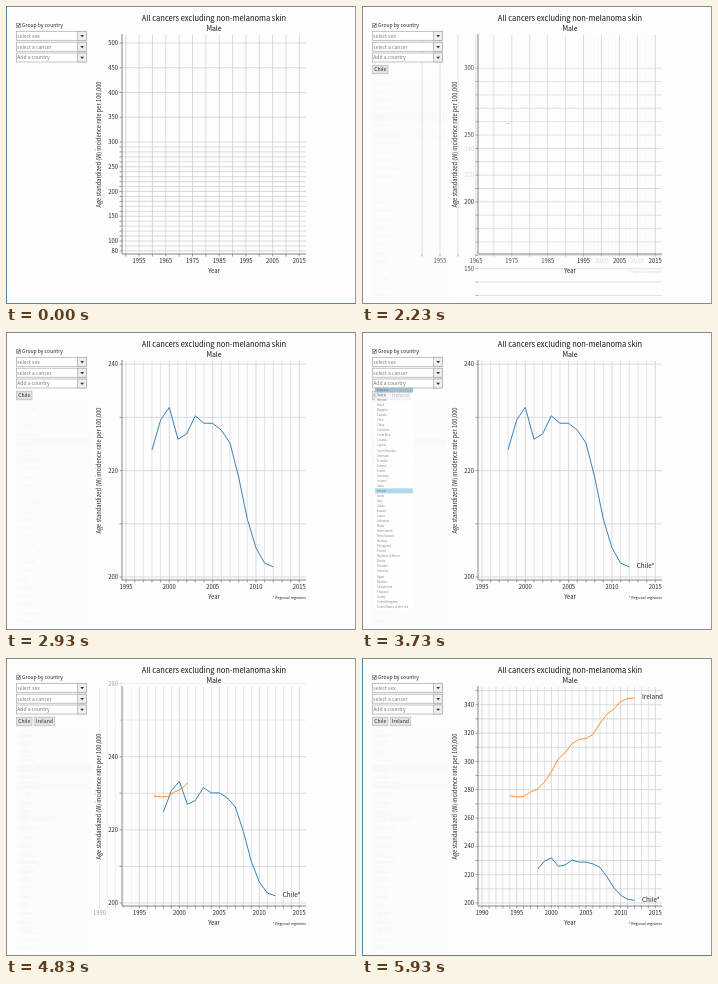
Recreate the animation shown at these times as an HTML page with a canvas. Size 350 px wide and 298 px high, loop 5960 ms.

```html
<!DOCTYPE html>
<html lang="en">
<head>
<meta charset="utf-8">
<title>Incidence rate chart</title>
<style>
  html, body { margin: 0; width: 100%; height: 100%; overflow: hidden; background: #fdfdfd; }
  canvas { display: block; width: 350px; height: 298px; }
</style>
</head>
<body>
<canvas></canvas>
<script>
const W = 350, H = 298, LOOP = 5960;
const LEFT = 116, RIGHT = 300, TOP = 30, BOTTOM = 248;
const FONT = '"Noto Sans CJK SC", "Noto Sans CJK JP", "Noto Sans CJK", "Noto Sans", sans-serif';
const canvas = document.querySelector('canvas');
const ctx = canvas.getContext('2d');
const dpr = window.devicePixelRatio || 1;
canvas.width = W * dpr;
canvas.height = H * dpr;

const clamp = v => Math.max(0, Math.min(1, v));
const mix = (a, b, p) => a + (b - a) * p;
const progress = (t, start, length) => clamp((t - start) / length);
const cubicInOut = p => p < .5 ? 4 * p ** 3 : 1 - 4 * (1 - p) ** 3;
const range = (from, to, step) =>
  Array.from({ length: Math.floor((to - from) / step) + 1 }, (_, i) => from + i * step);

// Each view has a scale (pixels per year / unit, position of 200) and its ticks.
const views = [
  { kx: 2.67, ky: .495, y200: 185.5,
    xLabels: range(1955, 2015, 10), xLines: range(1950, 2015, 5),
    yLabels: [80, ...range(100, 500, 50)],
    yLines: [...range(80, 300, 10), ...range(350, 500, 50)] },
  { kx: 8.667, ky: 5.32, y200: 245,
    xLabels: range(1995, 2015, 5), xLines: range(1995, 2015, 1),
    yLabels: range(200, 240, 20), yLines: range(200, 240, 10) },
  { kx: 6.93, ky: 1.416, y200: 245,
    xLabels: range(1990, 2015, 5), xLines: range(1990, 2015, 1),
    yLabels: range(200, 340, 20), yLines: range(200, 350, 10) }
];

const chile = { name: 'Chile*', color: '#3584bd', from: 1998, rates: [
  223.9, 229.5, 231.9, 225.9, 226.9, 230.3, 228.9, 228.9, 227.6, 225.2, 218.8, 210.9, 205.5, 202.6, 201.9] };
const ireland = { name: 'Ireland', color: '#fa8f31', from: 1994, rates: [
  275.6, 274.9, 275.2, 278.4, 280.5, 285.5, 292.5, 301.7, 306.3, 312.6,
  315.5, 316.2, 319, 326.8, 333.1, 337, 342.3, 344.4, 344.8] };

const countries = ('Australia,Austria,Bahrain,Brazil,Bulgaria,Canada,Chile,China,Colombia,Costa Rica,Croatia,' +
  'Cyprus,Czech Republic,Denmark,Ecuador,Estonia,France,Germany,Iceland,India,Ireland,Israel,Italy,Japan,' +
  'Kuwait,Latvia,Lithuania,Malta,Netherlands,New Zealand,Norway,Philippines,Poland,Republic of Korea,Russia,' +
  'Slovakia,Slovenia,Spain,Sweden,Switzerland,Thailand,Turkey,United Kingdom,United States of America').split(',');

function text(str, x, y, size, { color = '#222', align = 'left', weight = 400 } = {}) {
  ctx.font = `${weight} ${size}px ${FONT}`;
  ctx.fillStyle = color;
  ctx.textAlign = align;
  ctx.textBaseline = 'alphabetic';
  ctx.fillText(str, x, y + size * .365);
}

function line(x1, y1, x2, y2, color, width = .7) {
  ctx.strokeStyle = color;
  ctx.lineWidth = width;
  ctx.beginPath();
  ctx.moveTo(x1, y1);
  ctx.lineTo(x2, y2);
  ctx.stroke();
}

function box(x, y, w, h, fill, stroke) {
  ctx.fillStyle = fill;
  ctx.fillRect(x, y, w, h);
  if (!stroke) return;
  ctx.strokeStyle = stroke;
  ctx.lineWidth = .7;
  ctx.strokeRect(x, y, w, h);
}

function withAlpha(alpha, draw) {
  if (alpha <= 0) return;
  ctx.save();
  ctx.globalAlpha *= alpha;
  draw();
  ctx.restore();
}

const scaleX = (s, year) => 293.3 + (year - 2015) * s.kx;
const scaleY = (s, rate) => s.y200 - (rate - 200) * s.ky;

function blendScale(a, b, px, py) {
  return { kx: mix(a.kx, b.kx, px), ky: mix(a.ky, b.ky, py), y200: mix(a.y200, b.y200, py) };
}

// Shared ticks stay solid; the others fade out of one view and into the next.
function eachTick(a, b, p, key, draw) {
  for (const v of new Set([...a[key], ...b[key]])) {
    const alpha = (a[key].includes(v) ? 1 - p : 0) + (b[key].includes(v) ? p : 0);
    withAlpha(alpha, () => draw(v));
  }
}

function drawAxes(a, b, p, s) {
  eachTick(a, b, p, 'xLines', v => {
    const x = scaleX(s, v);
    line(x, TOP - 1, x, BOTTOM, v % 5 ? '#d8d8d8' : '#cacaca');
    line(x, BOTTOM, x, BOTTOM + 2.5, '#777');
  });
  eachTick(a, b, p, 'yLines', v => {
    const y = scaleY(s, v);
    line(LEFT, y, RIGHT, y, '#cdcdcd');
    line(LEFT - 2.5, y, LEFT, y, '#777');
  });
  eachTick(a, b, p, 'xLabels', v => text(v, scaleX(s, v), 255, 5.85, { align: 'center' }));
  eachTick(a, b, p, 'yLabels', v => text(v, 112, scaleY(s, v), 5.85, { align: 'right' }));
  line(LEFT, TOP - 2, LEFT, BOTTOM, '#777', .9);
  line(LEFT, BOTTOM, RIGHT, BOTTOM, '#777', .9);
}

function drawSeries(series, s, shown, labelAlpha) {
  const points = series.rates.map((r, i) => [scaleX(s, series.from + i), scaleY(s, r)]);
  const lengths = points.slice(1).map((q, i) => Math.hypot(q[0] - points[i][0], q[1] - points[i][1]));
  const total = lengths.reduce((sum, d) => sum + d, 0);
  if (shown > 0) {
    ctx.save();
    ctx.strokeStyle = series.color;
    ctx.lineWidth = 1;
    ctx.lineJoin = 'round';
    ctx.setLineDash([total * shown, total + 1]);
    ctx.beginPath();
    points.forEach(q => ctx.lineTo(...q));
    ctx.stroke();
    ctx.restore();
  }
  const [x, y] = points[points.length - 1];
  withAlpha(labelAlpha, () => text(series.name, x + 7.5, y - .8, 6.35));
}

function drawChart(t) {
  const second = t >= 4530;
  const [a, b] = second ? [views[1], views[2]] : views;
  const start = second ? 4356 : 1878;
  const moved = delay => t < 2230 ? 0 : cubicInOut(progress(t, start + delay, 1000));
  // The x axis and the existing line start a moment after the y axis.
  const lead = moved(0), late = moved(15);
  drawAxes(a, b, lead, blendScale(a, b, late, lead));
  drawSeries(chile, second ? blendScale(a, b, late, late) : views[1],
    progress(t, 2228, 690), progress(t, 2930, 400));
  drawSeries(ireland, views[2], progress(t, 4655, 760), progress(t, 5230, 200));

  const center = { align: 'center' };
  const heading = { align: 'center', color: '#111', weight: 500 };
  text('All cancers excluding non-melanoma skin', 208, 12, 7.5, heading);
  text('Male', 208, 22.5, 6.9, heading);
  text('Year', 208, 264.5, 5.85, center);
  ctx.save();
  ctx.translate(93.2, 138.5);
  ctx.rotate(-Math.PI / 2);
  text('Age standardized (W) incidence rate per 100,000', 0, 0, 5.7, center);
  ctx.restore();
  withAlpha(progress(t, 2130, 600), () =>
    text('* Regional registries', RIGHT, 265.5, 3.6, { align: 'right' }));
}

function drawSelect(label, y) {
  box(10.4, y, 70.2, 9, '#fff', '#aaa');
  box(71.5, y, 9.1, 9, '#eee', '#aaa');
  text(label, 11.3, y + 4.5, 5, { color: '#777' });
  ctx.fillStyle = '#333';
  ctx.beginPath();
  ctx.moveTo(74.3, y + 3.8);
  ctx.lineTo(78, y + 3.8);
  ctx.lineTo(76.15, y + 6);
  ctx.fill();
}

function drawTag(label, x, w) {
  box(x, 59.2, w, 8.6, '#e2e2e2', '#bbb');
  text(label, x + w / 2, 63.5, 5.1, { align: 'center' });
}

function drawControls(t) {
  const dimmed = t >= 1130 && t < 2230;
  withAlpha(dimmed ? .6 : 1, () => {
    box(10.4, 17.4, 4, 4, '#fff', '#888');
    line(11.2, 19.4, 12.2, 20.6, '#222', .8);
    line(12.2, 20.6, 13.8, 18, '#222', .8);
    text('Group by country', 16, 19.6, 5.05);
    drawSelect('select sex', 25.3);
    drawSelect('select a cancer', 36.2);
    drawSelect('Add a country', 47);
  });
  if (t >= 930) drawTag('Chile', 10.4, 15.6);
  if (t >= 3730) drawTag('Ireland', 28.2, 20.6);
}

function drawList({ x, y, w, pitch, size }, picked) {
  box(x, y, w, pitch * countries.length, '#fff');
  countries.forEach((name, i) => {
    const rowY = y + i * pitch;
    if (rowY > H) return;
    if (i === 0) box(x, rowY, w, pitch, '#7fa3bd');
    if (i === picked) box(x, rowY, w, pitch, '#8fcbe0');
    text(name, x + 2, rowY + pitch / 2, size, { color: '#555' });
  });
}

const wideList = { x: 10, y: 55.5, w: 75, pitch: 8.5, size: 5 };
const narrowList = { x: 13, y: 55.5, w: 38, pitch: 5.04, size: 2.75 };

// Faint remains of the closed list below the tags.
function drawGhost(alpha) {
  ctx.save();
  ctx.beginPath();
  ctx.rect(8, 69, 79, H);
  ctx.clip();
  withAlpha(alpha, () => {
    box(8, 69, 79, H, '#cfdcde');
    drawList(wideList, 6);
    box(10, 123.5, 75, 8, '#a5d6e8');
  });
  ctx.restore();
}

function drawLists(t) {
  if (t >= 230 && t < 1130) {
    const picked = Math.round(mix(0, 6, progress(t, 230, 400)));
    withAlpha(1 - progress(t, 730, 420), () => drawList(wideList, picked));
  }
  if (t >= 1130) drawGhost(t < 2230 ? .09 : .04);
  if (t >= 3430) {
    const alpha = t < 3730 ? 1 : mix(.7, .03, progress(t, 3730, 300));
    withAlpha(alpha, () => drawList(narrowList, t < 3530 ? 6 : 20));
  }
}

function draw(t) {
  ctx.setTransform(dpr, 0, 0, dpr, 0, 0);
  box(0, 0, W, H, '#fdfdfd');
  drawChart(t);
  drawControls(t);
  drawLists(t);
  const edge = t < 230 || t >= 5930 ? '#5580a8' : '#8a8a8a';
  line(0, .5, W, .5, '#888', 1);
  line(W - .5, 0, W - .5, H, '#999', 1);
  line(.5, 0, .5, H, edge, 1);
  line(0, H - .5, W, H - .5, edge, 1);
}

// The picture advances in steps of 100 ms, offset by 30 ms.
function frame() {
  const t = performance.now() % LOOP;
  draw(t < 30 ? 0 : Math.floor((t - 30) / 100) * 100 + 30);
  requestAnimationFrame(frame);
}
frame();
</script>
</body>
</html>
```
